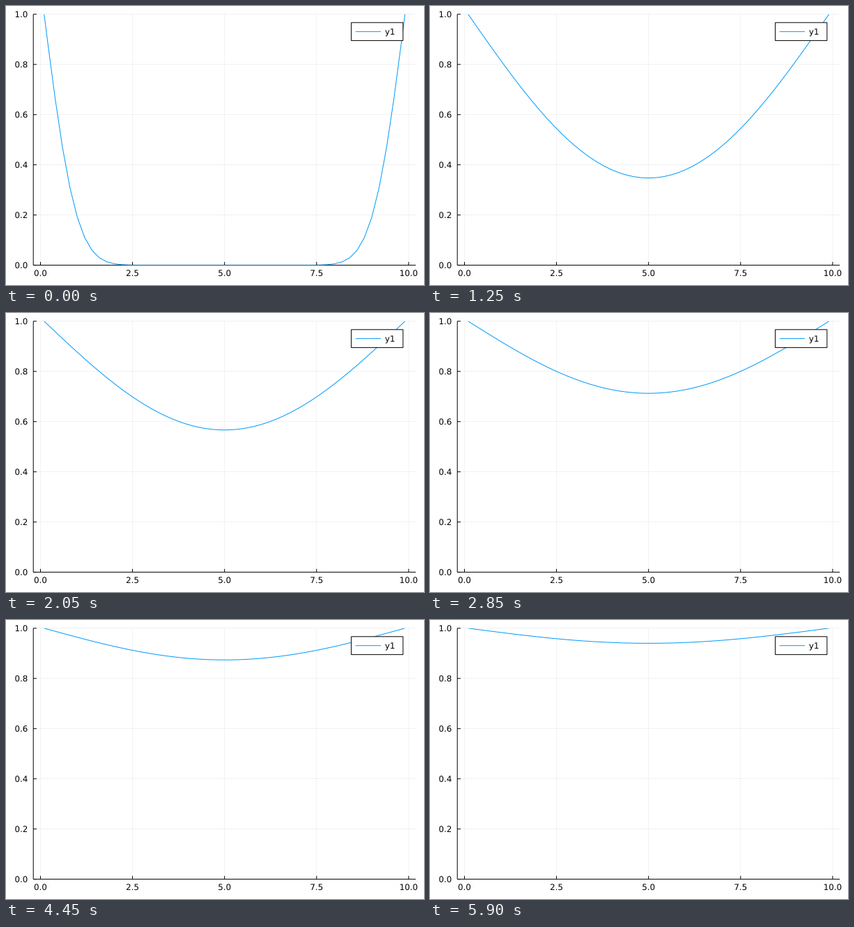
A matplotlib script that plays this animation: 600 px wide and 400 px high, repeating every 5.95 s.

```python
import numpy as np
import matplotlib.pyplot as plt
from matplotlib.animation import FuncAnimation
from matplotlib.patches import PathPatch, Rectangle
from matplotlib.path import Path
from matplotlib.textpath import TextPath
from matplotlib.transforms import Affine2D

W, H, DPI = 600, 400, 100
PT = 72 / DPI                      # points per pixel
LEFT, RIGHT, TOP, BOTTOM = 39.2, 588.19, 11.81, 371.6
X0, X1 = 0.1, 9.9                  # walls held at 1
PAD = 0.03 * (X1 - X0)
FRAMES, INTERVAL = 119, 50
STEP, LAG = 0.25, 0.0125           # diffusion time per frame
BLUE = "#009AFA"
TICK = 4.72
CAP = 8.64                         # cap height of all text
EM = CAP / 0.729

plt.rcParams["font.family"] = "DejaVu Sans"
fig = plt.figure(figsize=(W / DPI, H / DPI), dpi=DPI, facecolor="white")
ax = fig.add_axes([0, 0, 1, 1])
ax.set_xlim(0, W)
ax.set_ylim(H, 0)
ax.axis("off")


def px(x):
    return LEFT + (x - X0 + PAD) / (X1 - X0 + 2 * PAD) * (RIGHT - LEFT)


def py(y):
    return BOTTOM - y * (BOTTOM - TOP)


def stroke(xs, ys, color="black", width=1.0, **kw):
    return ax.plot(xs, ys, color=color, lw=width * PT, snap=False,
                   solid_capstyle="butt", **kw)[0]


def grid(xs, ys):
    stroke(xs, ys, width=0.5, alpha=0.1, zorder=1)


def label(x, y, s, align=0.0):
    """Unhinted text on baseline y; align is the share of its advance left of x."""
    advance = EM * sum(0.318 if c == "." else 0.636 for c in s)
    place = Affine2D().scale(1, -1).translate(x - align * advance, y)
    ax.add_patch(PathPatch(TextPath((0, 0), s, size=EM), fc="black", lw=0,
                           snap=False, transform=place + ax.transData, zorder=6))


def profile(t):
    """Heat equation on a cold rod with both ends held at 1."""
    n = np.arange(1, 60, 2)[:, None]
    k = n * np.pi / (X1 - X0)
    modes = 4 / (n * np.pi) * np.sin(k * (nodes - X0)) * np.exp(-k**2 * t)
    return 1 - modes.sum(axis=0)


# Grid, ticks and tick labels
for v in np.linspace(0, 10, 5):
    x = px(v)
    grid([x, x], [TOP, BOTTOM])
    stroke([x, x], [BOTTOM, BOTTOM - TICK], zorder=2)
    label(x, 387.1, f"{v:.1f}", 0.5)
for v in np.linspace(0, 1, 6):
    y = py(v)
    grid([LEFT, RIGHT], [y, y])
    stroke([LEFT, LEFT + TICK], [y, y], zorder=2)
    label(31.3, y + CAP / 2, f"{v:.1f}", 1)
stroke([LEFT, LEFT], [TOP, BOTTOM], zorder=2)
stroke([LEFT, RIGHT], [BOTTOM, BOTTOM], zorder=2)

# Curve
nodes = np.concatenate(([X0], np.arange(1, 50) * 0.2, [X1]))
curve = stroke(px(nodes), py(profile(STEP - LAG)), BLUE, zorder=3)
area = Path([(LEFT, TOP), (RIGHT, TOP), (RIGHT, BOTTOM), (LEFT, BOTTOM), (LEFT, TOP)])
curve.set_clip_path(area, ax.transData)

# Legend, inset by a thirtieth of the plot area
right = RIGHT - (RIGHT - LEFT) / 30
top = TOP + (BOTTOM - TOP) / 30
box_w, box_h = 74.3, 25.8
mid = top + box_h / 2
ax.add_patch(Rectangle((right - box_w, top), box_w, box_h, fc="white", ec="black",
                       lw=PT, snap=False, zorder=4))
stroke([501.7, 538], [mid, mid], BLUE, zorder=5)
label(543.9, mid + CAP / 2, "y1")


def update(i):
    curve.set_ydata(py(profile((i + 1) * STEP - LAG)))
    return [curve]


anim = FuncAnimation(fig, update, frames=FRAMES, interval=INTERVAL,
                     repeat=True, repeat_delay=0, blit=False)
plt.show()
```
